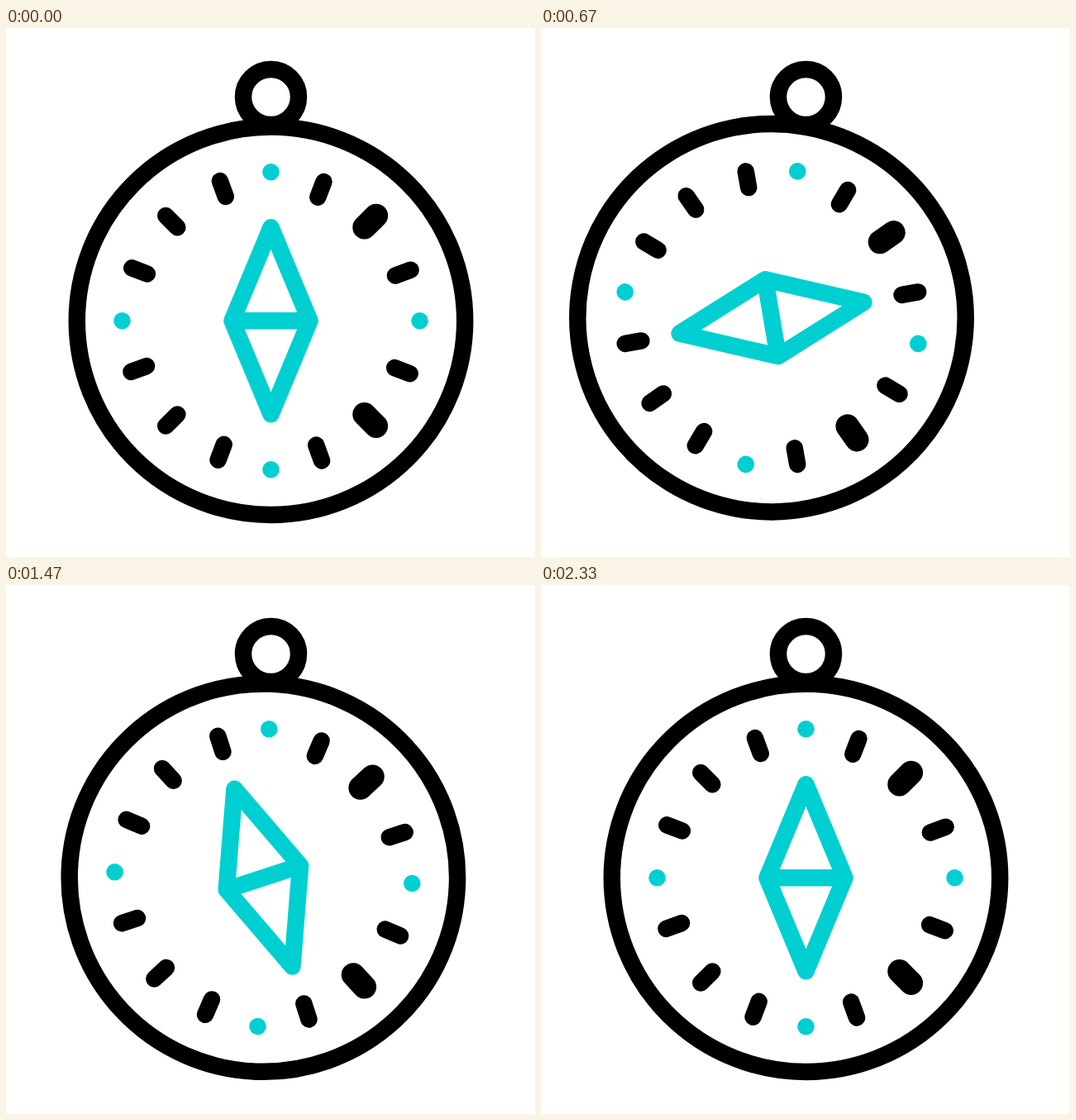
An HTML page that plays this animation: 640 by 640 pixels, repeating every 2.57 s.

```html
<!DOCTYPE html>
<html lang="en">
<head>
<meta charset="utf-8">
<title>Compass</title>
<style>
  html, body { margin: 0; width: 100%; height: 100%; overflow: hidden; background: #fff; }
  svg { display: block; width: 100%; height: 100%; }
</style>
</head>
<body>
<svg viewBox="0 0 640 640" fill="none" stroke="#000" stroke-width="20.5" stroke-linecap="round" stroke-linejoin="round">
  <circle cx="320.5" cy="83.5" r="33.5"/>
  <g id="body">
    <g transform="translate(320.5 354.3)">
      <circle r="234.7"/>
      <g id="dial"></g>
      <path id="needle" stroke="#00cfd1" d="M0-113L47 0L0 113L-47 0ZM-47 0H47"/>
    </g>
  </g>
</svg>
<script>
const LOOP = 2570, FPS = 30, LAST = 70, STEP = 10;
const PIVOT = '320.5 115.3';
// Angles in degrees, one key every STEP frames
const SWING = [0, -10, 10, -5, 5, -3, 3, 0];
const TURN = [0, 30.2, 70.4, 97.4, -35, 7, 48, 0];

const $ = id => document.getElementById(id);
const body = $('body'), dial = $('dial'), needle = $('needle');

function add(tag, attrs) {
  const el = document.createElementNS('http://www.w3.org/2000/svg', tag);
  for (const name in attrs) el.setAttribute(name, attrs[name]);
  dial.append(el);
}

function tick(angle, width) {
  add('path', { d: 'M0-160V-180', transform: `rotate(${angle})`, 'stroke-width': width });
}

for (let i = 0; i < 4; i++) {
  const a = i * 90;
  add('circle', { cy: -180, r: 10.3, fill: '#00cfd1', stroke: 'none', transform: `rotate(${a})` });
  tick(a + 20.8, 20.5);
  tick(a + 45, i < 2 ? 28.7 : 20.5);
  tick(a + 70, 20.5);
}

function valueAt(keys, frame) {
  const i = Math.min(Math.floor(frame / STEP), keys.length - 2);
  const u = frame / STEP - i;
  return keys[i] + (keys[i + 1] - keys[i]) * u * u * (3 - 2 * u);
}

function draw(ms) {
  const t = Math.floor((ms % LOOP) / 10) * 10;
  const frame = Math.min(LAST, Math.floor((t + 4) * FPS / 1000));
  body.setAttribute('transform', `rotate(${valueAt(SWING, frame)} ${PIVOT})`);
  needle.setAttribute('transform', `rotate(${valueAt(TURN, frame)})`);
}

function loop() {
  draw(performance.now());
  requestAnimationFrame(loop);
}
loop();
</script>
</body>
</html>
```
